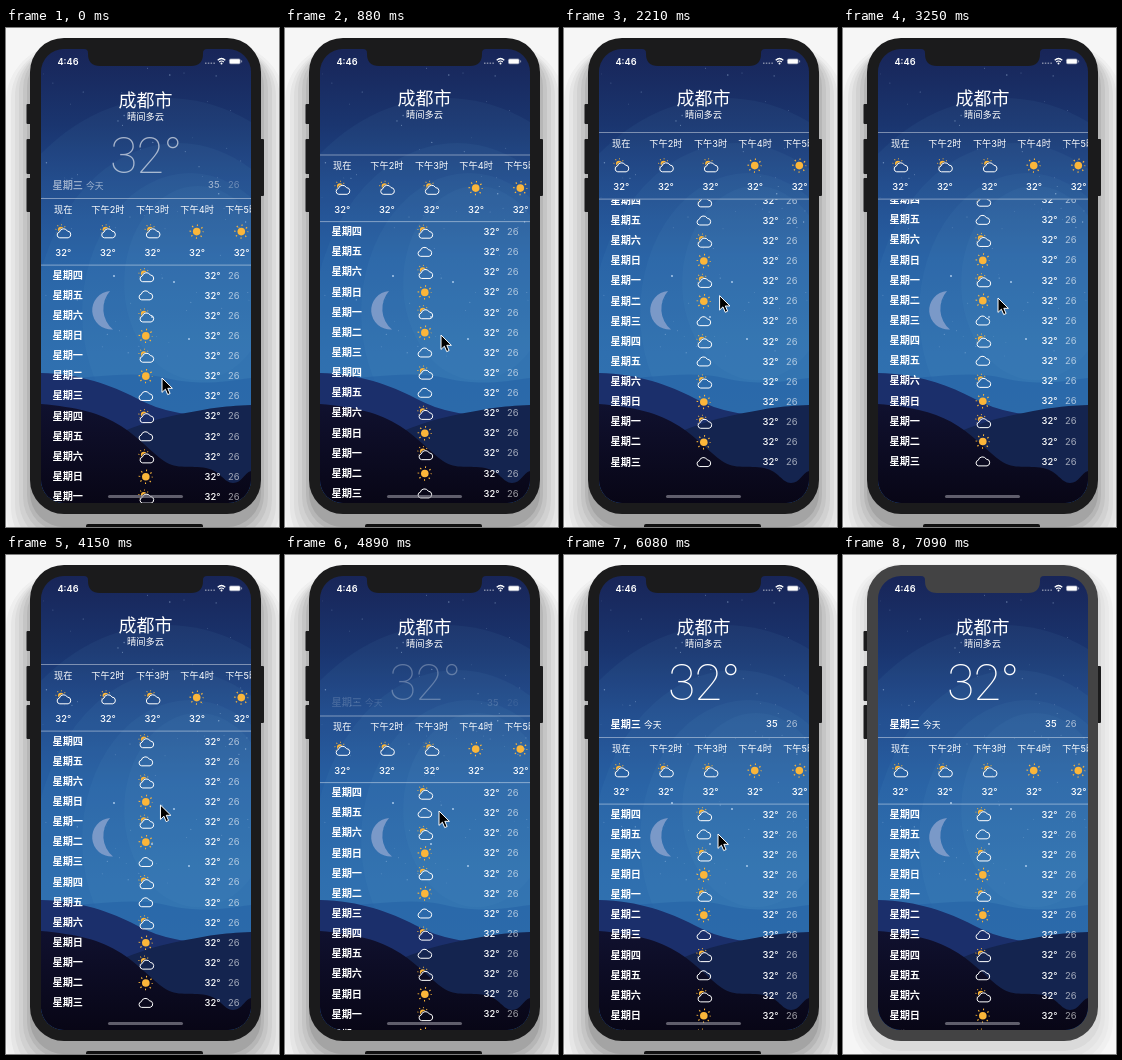
These frames come from a looping animation (273 by 499 pixels, 7190 ms). An HTML page:

```html
<!DOCTYPE html>
<html lang="zh-CN">
<head>
<meta charset="utf-8">
<title>天气</title>
<style>
  html, body { margin: 0; width: 100%; height: 100%; overflow: hidden; background: #f6f6f6; }
  svg { display: block; }
  text { font-family: Inter, "Noto Sans CJK SC", "Noto Sans CJK JP", "Noto Sans CJK", sans-serif; fill: #fff; }
  .mid { text-anchor: middle; }
  .day { font-size: 10.2px; font-weight: 600; }
  .num { font-size: 9.4px; font-weight: 500; }
  .low { font-size: 9.4px; opacity: .6; }
  .hour { font-size: 9.2px; }
  .big { font: 200 50px Roboto, Lato, sans-serif; letter-spacing: -.8px; }
  .rule { fill: #fff; opacity: .42; }
  .bezel, .button { fill: #1b1b1c; }
  .inactive .bezel { fill: #434344; }
  .inactive .active-only, .idle-only { display: none; }
  .inactive .idle-only { display: inline; }
</style>
</head>
<body>
<svg id="stage" width="273" height="499" viewBox="0 0 273 499">
  <defs>
    <linearGradient id="sky" x1="0" y1="21" x2="0" y2="400" gradientUnits="userSpaceOnUse">
      <stop offset="0" stop-color="#182558"/>
      <stop offset=".2" stop-color="#1a356f"/>
      <stop offset=".35" stop-color="#1e4688"/>
      <stop offset=".55" stop-color="#225aa0"/>
      <stop offset=".8" stop-color="#2767ab"/>
      <stop offset="1" stop-color="#2a6bab"/>
    </linearGradient>
    <linearGradient id="ground" x1="0" y1="375" x2="0" y2="475" gradientUnits="userSpaceOnUse">
      <stop offset="0" stop-color="#10112f"/>
      <stop offset="1" stop-color="#080616"/>
    </linearGradient>
    <clipPath id="screen"><rect x="35" y="21" width="210" height="454" rx="23"/></clipPath>
    <clipPath id="below"><rect id="belowBox" x="35" y="250" width="210" height="454"/></clipPath>
    <path id="shape" d="M-4.2 4.2a2.9 2.9 0 0 1-.3-5.7a4.3 4.3 0 0 1 8-1a3.4 3.4 0 0 1 .8 6.7z" stroke-linejoin="round"/>
    <mask id="behind" maskUnits="userSpaceOnUse" x="-10" y="-10" width="20" height="20">
      <rect x="-10" y="-10" width="20" height="20" fill="#fff"/>
      <use href="#shape" x="1" y="2" stroke="#000" stroke-width="1.6"/>
    </mask>
    <g id="sun" fill="#fbb63a" stroke="#fbb63a">
      <circle r="3.8" stroke="none"/>
      <circle r="6.4" fill="none" stroke-width="1.6" stroke-dasharray="1.1 3.927" stroke-dashoffset=".55"/>
    </g>
    <use id="cloud" href="#shape" fill="none" stroke="#fff"/>
    <g id="partly">
      <g mask="url(#behind)"><g transform="translate(-2 -2) scale(.76)"><use href="#sun"/></g></g>
      <use href="#cloud" x="1" y="2"/>
    </g>
  </defs>

  <rect width="273" height="499" fill="#f6f6f6"/>
  <g id="shadow" class="active-only"></g>
  <g id="softShadow" class="idle-only"></g>
  <path class="active-only" d="M80 499v-1q0-2 2-2h113q2 0 2 2v1z" fill="#111"/>

  <g class="button">
    <rect x="20.5" y="76" width="5" height="20" rx="1"/>
    <rect x="20.5" y="111" width="5" height="35" rx="1"/>
    <rect x="20.5" y="150" width="5" height="34" rx="1"/>
    <rect x="253" y="111" width="5" height="57" rx="1"/>
  </g>
  <rect class="bezel" x="24" y="10" width="231" height="476" rx="34"/>

  <g clip-path="url(#screen)">
    <rect x="35" y="21" width="210" height="454" fill="url(#sky)"/>
    <g fill="#5aa0cc" fill-opacity=".075">
      <ellipse cx="160" cy="310" rx="195" ry="240"/>
      <ellipse cx="172" cy="305" rx="145" ry="190"/>
      <ellipse cx="184" cy="285" rx="108" ry="140"/>
      <ellipse cx="192" cy="255" rx="74" ry="97"/>
    </g>
    <g id="stars" fill="#bcd8f4"></g>
    <path d="M104 263A19.3 19.3 0 0 0 107 301.5A27 27 0 0 1 104 263z" fill="#7a99c8"/>
    <path d="M35 352C90 350 125 342 160 350S215 354 245 350V475H35z" fill="#225fa4" opacity=".5"/>
    <path d="M35 345C75 346 105 357 130 370S165 383 190 388V475H35z" fill="#1b2f6b"/>
    <path d="M95 414C125 398 150 391 175 386S215 378 245 377V475H95z" fill="#14244f"/>
    <path d="M35 376C70 379 95 385 115 398S145 424 158 433S185 437 200 440S218 455 227 455S238 445 245 443V475H35z" fill="url(#ground)"/>

    <g id="city" class="mid">
      <text x="139.5" y="78.5" font-size="18">成都市</text>
      <text x="139.5" y="92" font-size="9.3">晴间多云</text>
    </g>
    <text id="temp" class="big" x="104" y="145.2">32°</text>

    <g id="today">
      <text class="day" x="46.5" y="-9.3">星期三</text>
      <text x="80" y="-9.5" font-size="8.8">今天</text>
      <text class="num" x="202" y="-9.6">35</text>
      <text class="low" x="222" y="-9.6">26</text>
    </g>
    <g id="hours">
      <rect class="rule" x="35" width="210" height="1"/>
      <rect class="rule" x="35" y="66.6" width="210" height="1"/>
    </g>
    <g clip-path="url(#below)"><g id="days"></g></g>

    <path d="M78 21q4 0 4 4v1q0 12 12 12h91q12 0 12-12v-1q0-4 4-4z" class="bezel"/>
    <text class="mid" x="62" y="36.5" font-size="9.2" font-weight="600">4:46</text>
    <g fill="#fff">
      <path d="M199 35.2h1.5m1.3 0h1.5m1.3 0h1.5m1.3 0h1.5" stroke="#fff" stroke-width="1.4" opacity=".45"/>
      <path d="M211.7 32.2q3.8-3.4 7.6 0M213.2 34q2.3-2 4.6 0" fill="none" stroke="#fff" stroke-width="1.2"/>
      <circle cx="215.5" cy="35.6" r="1"/>
      <rect x="223" y="30.6" width="11.6" height="5.6" rx="1.6" opacity=".45"/>
      <rect x="223.8" y="31.3" width="10" height="4.2" rx="1"/>
      <rect x="235.2" y="32.4" width=".9" height="2" opacity=".6"/>
    </g>
    <rect x="102" y="467" width="75" height="3" rx="1.5" fill="#9a98a3" opacity=".6"/>
  </g>
  <path id="cursor" d="M0 0V14.4L3.4 11.2L5.7 16.6L8.1 15.5L5.8 10.3H10.4z"
    fill="#000" stroke="#fff" stroke-width="1" stroke-linejoin="round"/>
</svg>
<script>
const LOOP = 7190, STEP = 148.2;
const $ = id => document.getElementById(id);
const add = (id, html) => $(id).insertAdjacentHTML('beforeend', html);
const clamp = (v, lo, hi) => Math.min(hi, Math.max(lo, v));

// bands of [growth, drop, grey]
function addShadow(id, bands) {
  bands.forEach(([grow, drop, grey]) => add(id,
    `<rect x="${24 - grow}" y="${10 - grow + drop}" width="${231 + 2 * grow}" height="${476 + 2 * grow}" rx="${34 + grow}" fill="rgb(${grey},${grey},${grey})"/>`));
}
addShadow('shadow', [[24, 30, 239], [19, 27, 230], [15, 24, 220], [11, 20, 209], [7, 17, 197], [3, 15, 182], [0, 13, 164]]);
addShadow('softShadow', [[15, 14, 240], [11, 12, 234], [7, 10, 228], [3, 7, 218]]);

let seed = 11;
const random = () => (seed = seed * 16807 % 2147483647) / 2147483647;
for (let i = 0; i < 75; i++) {
  const x = 37 + random() * 206, y = 40 + random() * 290;
  add('stars', `<circle cx="${x}" cy="${y}" r="${.3 + random() * .4}" opacity="${.2 + random() * .4}"/>`);
}
[[183, 311], [146, 289], [108, 248], [168, 254]].forEach(([x, y]) =>
  add('stars', `<circle cx="${x}" cy="${y}" r="1.1" opacity=".8"/>`));

['现在', '下午2时', '下午3时', '下午4时', '下午5时'].forEach((label, i) => {
  const x = 57.3 + i * 44.6;
  add('hours', `<text class="hour mid" x="${x}" y="14.7">${label}</text>
    <use href="#${i < 3 ? 'partly' : 'sun'}" x="${x - .4}" y="33.6"/>
    <text class="num mid" x="${x}" y="58.2">32°</text>`);
});

const week = '四五六日一二三';
const icons = ['partly', 'cloud', 'partly', 'sun', 'partly', 'sun', 'cloud'];
for (let i = 0; i < 14; i++) {
  const y = 259 + i * 20.13;
  add('days', `<text class="day" x="46.5" y="${y + 3.7}">星期${week[i % 7]}</text>
    <use href="#${icons[i % 7]}" x="139.8" y="${y + .5}"/>
    <text class="num" x="198.5" y="${y + 3.5}">32°</text>
    <text class="low" x="222" y="${y + 3.5}">26</text>`);
}

// [step, value] pairs
const scroll = [[0, 12], [6, 55.5], [8, 76], [9, 81], [10, 86], [16, 87], [17, 87.5], [22, 87.5], [23, 81],
  [24, 75.5], [25, 73], [30, 73], [31, 62], [32, 42], [33, 21.5], [35, 0], [36, -6], [38, -4], [41, 0]];
const pointerX = [[0, 156], [10, 156], [22, 155], [33, 154]];
const pointerY = [[0, 350], [6, 307], [8, 286], [10, 266], [22, 270], [25, 297], [27, 297], [28, 250], [29, 200],
  [30, 200], [31, 212], [32, 235], [33, 256], [36, 285], [38, 283], [41, 279], [42, 279], [46, 505]];

function at(track, k) {
  const n = track.findIndex(p => p[0] > k);
  if (n < 0) return track[track.length - 1][1];
  const [k0, v0] = track[n - 1], [k1, v1] = track[n];
  return v0 + (v1 - v0) * (k - k0) / (k1 - k0);
}

const move = (id, x, y) => $(id).setAttribute('transform', `translate(${x} ${y})`);

function draw(now) {
  const k = Math.floor((now % LOOP + 12) / STEP);
  const s = at(scroll, k), top = 182 - Math.min(s, 78);
  move('city', 0, -2 * clamp((s - 22) / 16, 0, 1));
  move('today', 0, top);
  move('hours', 0, top);
  move('days', 0, -s);
  $('belowBox').setAttribute('y', top + 67.6);
  $('temp').style.opacity = clamp(1 - s / 30, 0, 1);
  $('today').style.opacity = clamp(1 - s / 25, 0, 1);
  move('cursor', at(pointerX, k), at(pointerY, k));
  $('stage').classList.toggle('inactive', k >= 46);
}

const start = performance.now();
function tick() {
  draw(performance.now() - start);
  requestAnimationFrame(tick);
}
tick();
</script>
</body>
</html>
```
